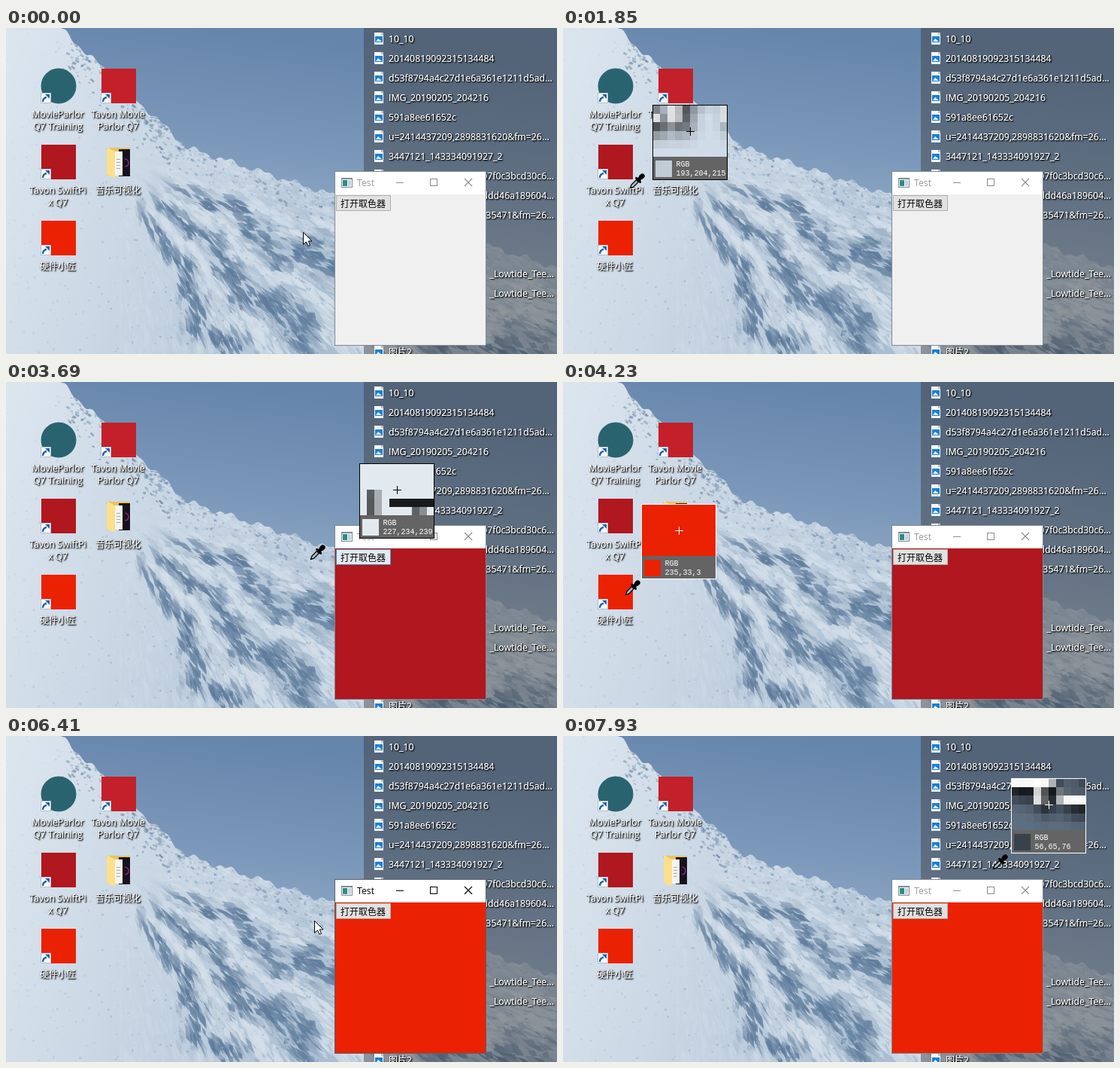
Write an HTML page with a canvas that moves like this. It is 733 px wide and 433 px high and loops after 7990 ms.

```html
<!DOCTYPE html>
<html lang="zh-CN">
<head>
<meta charset="utf-8">
<title>Colour picker</title>
<style>
html, body { margin: 0; width: 100%; height: 100%; overflow: hidden; background: #c4d2df; }
canvas { display: block; }
</style>
</head>
<body>
<canvas id="stage" width="733" height="433"></canvas>
<script>
const W = 733, H = 433, LOOP = 7990, LAG = 80;
const CJK = '"Noto Sans CJK SC", "Noto Sans CJK", sans-serif';
const UI = '"Open Sans", ' + CJK;
const RED = '#b0171e', ORANGE = '#eb2103';
const stage = document.getElementById('stage').getContext('2d', { willReadFrequently: true });
const backdrop = document.createElement('canvas');
backdrop.width = W;
backdrop.height = H;

// Pointer moves: begin, end, destination
const HOME = [395, 271];
const MOVES = [
  [30, 620, 484, 238],
  [870, 1620, 107, 230],
  [1660, 2060, 69, 194],
  [2760, 3040, 475, 226],
  [3510, 4180, 83, 283],
  [4410, 4710, 95, 277],
  [4890, 4990, 88, 274],
  [5320, 5590, 92, 272],
  [5960, 6570, 474, 240],
  [6740, 7000, 111, 250],
  [7000, 7350, 614, 169],
  [7350, 7480, 595, 177],
  [7600, 7960, 572, 177]
];
// Spans in which the picker is open
const PICKS = [[720, 2600], [3420, 5930], [6690, LOOP]];

const clamp = v => Math.min(1, Math.max(0, v));
const ease = p => p * p * (3 - 2 * p);

function pointer(t) {
  let [x, y] = HOME;
  for (const [a, b, tx, ty] of MOVES) {
    const p = ease(clamp((t - a) / (b - a)));
    x += (tx - x) * p;
    y += (ty - y) * p;
  }
  return [Math.round(x), Math.round(y)];
}

function seeded(s) {
  return () => (s = (s * 16807) % 2147483647) / 2147483647;
}

function mix(a, b, p) {
  return `rgb(${a.map((v, i) => Math.round(v + (b[i] - v) * p))})`;
}

function rect(c, color, x, y, w, h) {
  c.fillStyle = color;
  c.fillRect(x, y, w, h);
}

function frame(c, color, x, y, w, h) {
  c.strokeStyle = color;
  c.lineWidth = 1;
  c.strokeRect(x + .5, y + .5, w - 1, h - 1);
}

function trace(c, pts) {
  c.beginPath();
  for (let i = 0; i < pts.length; i += 2) c.lineTo(pts[i], pts[i + 1]);
}

function poly(c, color, pts) {
  trace(c, pts);
  c.closePath();
  c.fillStyle = color;
  c.fill();
}

function line(c, color, width, ...pts) {
  trace(c, pts);
  c.strokeStyle = color;
  c.lineWidth = width;
  c.stroke();
}

function text(c, str, x, y, font, color, align = 'left') {
  c.font = font;
  c.fillStyle = color;
  c.textAlign = align;
  c.fillText(str, x, y);
}

function label(c, str, x, y, align) {
  const size = str.charCodeAt(0) > 255 ? 12 : 12.3;
  c.save();
  c.shadowColor = '#000';
  c.shadowBlur = 2;
  c.shadowOffsetX = c.shadowOffsetY = 1;
  for (let i = 0; i < 2; i++) text(c, str, x, y + 4.5, `${size}px ${UI}`, '#fff', align);
  c.restore();
}

// Height of the skyline at x
function ridge(x) {
  const steep = (x - 72) * .94;
  const gentle = 158 + (x - 238) * .325;
  return (x < 238 ? steep : gentle) + 3 * Math.sin(x / 7) + 2 * Math.sin(x / 2.7);
}

function drawMountain(c) {
  const sky = c.createLinearGradient(300, 0, 260, 300);
  sky.addColorStop(0, '#6685ab');
  sky.addColorStop(.5, '#7b98ba');
  sky.addColorStop(1, '#9db2cb');
  rect(c, sky, 0, 0, W, H);

  const rnd = seeded(77);
  const outline = [0, H, 0, 0];
  for (let x = 72; x <= W + 3; x += 3) outline.push(x, ridge(x));
  c.save();
  trace(c, [...outline, W, H]);
  c.clip();
  const snow = c.createLinearGradient(0, 60, 480, 200);
  snow.addColorStop(0, '#dbe5ee');
  snow.addColorStop(.4, '#cbd8e5');
  snow.addColorStop(1, '#a9bed2');
  rect(c, snow, 0, 0, W, H);

  // Lit and shaded ribs fan out from the shoulder of the mountain
  const ox = 140, oy = 160, dark = [92, 122, 155], light = [212, 223, 234];
  for (let i = 0; i < 3600; i++) {
    const x = 150 + rnd() * (W - 150), y = 165 + rnd() * (H - 165);
    const r = Math.hypot(x - ox, y - oy);
    const a = Math.atan2(y - oy, x - ox) + rnd() * .06;
    const deg = a * 180 / Math.PI + 2.5 * Math.sin(r / 23) + 1.5 * Math.sin(r / 9);
    const reach = clamp((deg - 17) / 8) * clamp((70 - deg) / 5) * clamp((r - 60) / 50);
    const shade = reach * (.45 + .55 * Math.cos((deg - 31) * Math.PI / 8));
    const len = 5 + rnd() * 13, wide = 1.5 + rnd() * 4;
    const dx = Math.cos(a), dy = Math.sin(a);
    c.globalAlpha = .15 + .6 * reach;
    poly(c, mix(light, dark, clamp(shade + rnd() * .3 - .15)), [
      x - dx * len, y - dy * len, x + dy * wide, y - dx * wide,
      x + dx * len, y + dy * len, x - dy * wide * rnd(), y + dx * wide
    ]);
  }

  // Broken rock below the skyline, then fine grain
  for (let i = 0; i < 700; i++) {
    const x = 85 + rnd() * 360, depth = rnd() * rnd() * 45;
    c.globalAlpha = .2 + rnd() * .35;
    const size = 1.5 + rnd() * 3.5;
    line(c, mix(dark, light, Math.round(rnd() + (x > 238 ? .3 : -.1))), size / 1.5,
      x - depth * .4, ridge(x) + depth, x - depth * .4 + size, ridge(x) + depth + size * rnd());
  }
  for (let i = 0; i < 2200; i++) {
    const x = rnd() * W, y = rnd() * H, size = 1 + rnd() * 2;
    c.globalAlpha = (.1 + .25 * rnd()) * clamp(.25 + x / 300);
    rect(c, mix(dark, light, Math.round(rnd())), x, y, size, size);
  }
  c.restore();
}

function shortcut(c, x, y) {
  rect(c, '#f6f8fa', x, y, 14, 14);
  frame(c, '#b5bfc8', x, y, 14, 14);
  c.beginPath();
  c.moveTo(x + 3, y + 12);
  c.quadraticCurveTo(x + 3, y + 7, x + 8, y + 6);
  c.strokeStyle = '#1c62ad';
  c.lineWidth = 2.4;
  c.stroke();
  poly(c, '#1c62ad', [x + 6, y + 2, x + 12, y + 2, x + 12, y + 8]);
}

function disc(c, color, x, y) {
  c.beginPath();
  c.arc(x, y, 23.5, 0, 7);
  c.fillStyle = color;
  c.fill();
}

function tile(c, color, x, y) {
  rect(c, color, x - 23, y - 23, 46, 46);
}

function folder(c, color, x, y) {
  rect(c, '#e8c35f', x - 16, y - 19, 31, 37);
  rect(c, '#17131d', x, y - 17, 15, 36);
  c.beginPath();
  c.arc(x + 8, y + 1, 5, -1.5, 1.5);
  c.strokeStyle = '#a32b8c';
  c.lineWidth = 1.2;
  c.stroke();
  rect(c, '#f4f4ef', x - 9, y - 14, 14, 32);
  for (let i = 0; i < 4; i++) rect(c, '#a9a9a4', x - 3, y - 4 + 4 * i, 5, 1);
  poly(c, color, [x - 16, y - 20, x - 5, y - 14, x - 5, y + 22, x - 16, y + 17]);
}

// Desktop grid: column, row, painter, colour, label lines
const ICONS = [
  [0, 0, disc, '#2a6370', 'MovieParlor', 'Q7 Training'],
  [1, 0, tile, '#c3202a', 'Tavon Movie', 'Parlor Q7'],
  [0, 1, tile, RED, 'Tavon SwiftPi', 'x Q7'],
  [1, 1, folder, '#fbdf8d', '音乐可视化'],
  [0, 2, tile, ORANGE, '硬件小匠']
];

function drawIcons(c) {
  for (const [col, row, paint, color, ...lines] of ICONS) {
    const x = 70 + 80 * col, y = 77 + 101 * row;
    paint(c, color, x, y);
    if (paint !== folder) shortcut(c, x - 24, y + 9);
    lines.forEach((s, i) => label(c, s, x - 1, y + 37 + 16 * i, 'center'));
  }
}

function hoverIcon(c, px, py) {
  for (const [col, row, , , ...lines] of ICONS) {
    const x = 33 + 80 * col, y = 52 + 101 * row, h = 56 + 16 * lines.length;
    if (px < x || px > x + 74 || py < y || py > y + h) continue;
    rect(c, 'rgba(255,255,255,.2)', x, y, 74, h);
    frame(c, 'rgba(255,255,255,.3)', x, y, 74, h);
  }
}

function drawFiles(c) {
  rect(c, 'rgba(60,60,60,.45)', 476, 0, W - 476, H);
  const files = ['10_10', '20140819092315134484', 'd53f8794a4c27d1e6a361e1211d5ad...',
    'IMG_20190205_204216', '591a8ee61652c', 'u=2414437209,2898831620&fm=26...',
    '3447121_143334091927_2', '07f0c3bcd30c6...', 'ddd46a189604...', '35471&fm=26...',
    '', '', '_Lowtide_Tee...', '_Lowtide_Tee...', '', '', '图片2'];
  files.forEach((name, i) => {
    const y = 14 + 26 * i, tail = i > 6 && i < 14;
    rect(c, '#f7fafc', 490, y - 8, 12, 16);
    rect(c, '#b8c5d0', 499, y - 8, 3, 3);
    rect(c, '#1b7fd1', 491, y - 3, 10, 8);
    poly(c, '#e8f4fd', [492, y + 4, 495, y, 500, y + 4]);
    label(c, name, tail ? 729 : 509, y, tail ? 'right' : 'left');
  });
}

function drawWindow(c, fill, active, glow) {
  rect(c, '#fff', 437, 190, 202, 232);
  frame(c, active ? '#55616d' : '#7d8790', 437, 190, 202, 232);
  rect(c, fill, 438, 221, 200, 200);
  const ink = active ? '#000' : '#8c8c8c';

  rect(c, '#f5f7f8', 446, 199, 15, 13);
  frame(c, '#7c8b96', 446, 199, 15, 13);
  rect(c, '#7c8b96', 447, 199, 13, 2);
  rect(c, '#2e8b83', 448, 202, 6, 8);
  rect(c, '#c3d3dc', 455, 202, 4, 8);

  text(c, 'Test', 467, 210, '12.3px ' + UI, active ? '#000' : '#999');
  rect(c, ink, 519, 205, 10, 1);
  frame(c, ink, 564, 200, 10, 10);
  line(c, ink, 1.1, 610, 200, 620, 210);
  line(c, ink, 1.1, 620, 200, 610, 210);

  rect(c, mix([225, 225, 225], [229, 241, 251], glow), 439, 222, 73, 21);
  frame(c, mix([173, 173, 173], [0, 120, 215], glow), 439, 222, 73, 21);
  text(c, '打开取色器', 475, 237.5, '12px ' + CJK, '#000', 'center');
}

function drawArrow(c, x, y) {
  c.save();
  c.translate(x + .5, y + .5);
  poly(c, '#fff', [0, 0, 0, 16, 4, 12.5, 6.5, 18, 9, 17, 6.7, 11.5, 11.5, 11.5]);
  c.strokeStyle = '#000';
  c.lineWidth = 1;
  c.stroke();
  c.restore();
}

function drawDropper(c, x, y) {
  c.save();
  c.translate(x + .5, y - .5);
  c.rotate(-Math.PI / 4);
  poly(c, '#aebccb', [0, 0, 4, -2, 14, -2, 14, 2, 4, 2]);
  c.strokeStyle = '#000';
  c.lineWidth = 1.3;
  c.stroke();
  c.lineCap = 'round';
  line(c, '#000', 3, 15, -3.5, 15, 3.5);
  line(c, '#000', 5, 15, 0, 22, 0);
  line(c, '#000', 6.5, 21, 0, 22.5, 0);
  c.restore();
}

function drawLens(c, [px, py]) {
  const cols = 10, rows = 6, x = px + 19, y = py - 121;
  const data = c.getImageData(px - 5, py - 5, cols, rows).data;
  const pixel = (i, j) => Array.from(data.slice((j * cols + i) * 4, (j * cols + i) * 4 + 3));
  for (let j = 0; j < rows; j++) {
    const top = Math.round(j * 70 / rows), bottom = Math.round((j + 1) * 70 / rows);
    for (let i = 0; i < cols; i++) rect(c, `rgb(${pixel(i, j)})`, x + i * 10, y + top, 10, bottom - top);
  }
  const [r, g, b] = pixel(5, 3);
  const ink = .3 * r + .59 * g + .11 * b > 128 ? '#000' : '#fff';
  rect(c, '#646464', x, y + 69, 100, 31);
  rect(c, `rgb(${r},${g},${b})`, x + 4, y + 74, 22, 22);
  const font = '10px "Liberation Mono", monospace';
  text(c, 'RGB', x + 31.5, y + 82, font, '#fff');
  text(c, [r, g, b].join(), x + 31.5, y + 94, font, '#fff');
  rect(c, ink, x + 45, y + 35, 11, 1);
  rect(c, ink, x + 50, y + 30, 1, 11);
  frame(c, ink, x, y, 100, 100);
}

function render(t) {
  const c = stage, [x, y] = pointer(t);
  const pick = PICKS.find(([a, b]) => t >= a && t < b);
  const over = x >= 439 && x < 512 && y >= 222 && y < 243;
  const glow = pick ? clamp(1 - (t - pick[0]) / 600) : over ? 1 : 0;
  const fill = t < 2570 ? '#f0f0f0' : t < 5900 ? RED : ORANGE;

  c.drawImage(backdrop, 0, 0);
  if (!pick) hoverIcon(c, x, y);
  drawWindow(c, fill, !pick && t >= 600, glow);
  if (pick) {
    drawLens(c, pointer(Math.max(pick[0], t - LAG)));
    drawDropper(c, x, y);
  } else {
    drawArrow(c, x, y);
  }
}

const back = backdrop.getContext('2d');
drawMountain(back);
drawFiles(back);
drawIcons(back);

const start = performance.now();
function tick() {
  render((performance.now() - start) % LOOP);
  requestAnimationFrame(tick);
}
tick();
</script>
</body>
</html>
```
